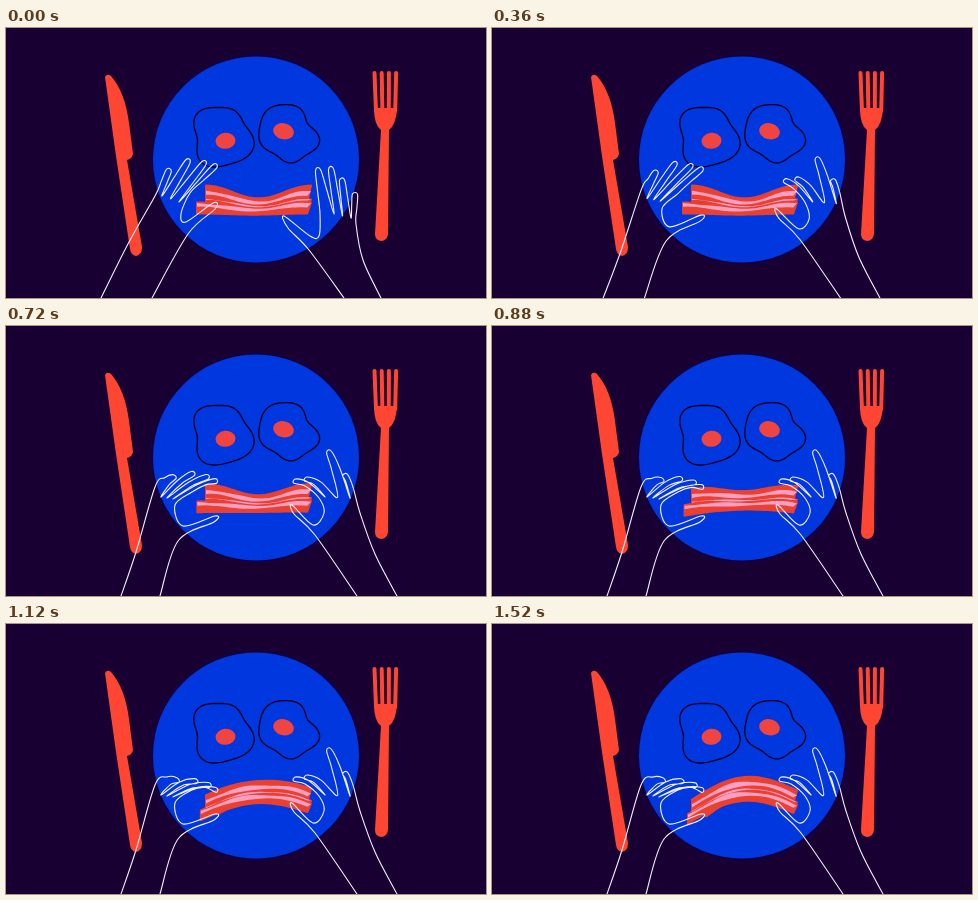
Recreate the animation shown at these times as an HTML page with a canvas. Size 480 by 270 pixels, loop 1560 ms.

```html
<!DOCTYPE html>
<html>
<head>
<meta charset="utf-8">
<title>Breakfast face</title>
<style>
html, body { margin: 0; overflow: hidden; background: #190033; }
canvas { display: block; }
</style>
</head>
<body>
<canvas id="stage" width="480" height="270"></canvas>
<script>
const ctx = document.getElementById('stage').getContext('2d');
const LOOP = 1560, STEP = 40, TAU = Math.PI * 2;
const NIGHT = '#190033', BLUE = '#0037de', RED = '#ff4632', YOLK = '#f04440';
const MEAT = '#e9402f', PINK = '#ff9fc3', INK = '#0c0024', CHALK = '#f4f0ff';

const lerp = (a, b, u) => a + (b - a) * u;
const mix = (p, q, u) => [lerp(p[0], q[0], u), lerp(p[1], q[1], u)];
const mixAll = (a, b, u) => a.map((p, i) => mix(p, b[i], u));
const points = text => text.split(' ').map(p => p.split(',').map(Number));
const ramp = (t, from, to) => Math.max(0, Math.min(1, (t - from) / (to - from)));
const easeOut = u => u * (2 - u);
const smooth = u => u * u * (3 - 2 * u);

// Open curve through the points.
function curve(pts) {
  const path = new Path2D(), last = pts.length - 1;
  path.moveTo(...pts[0]);
  for (let i = 0; i < last; i++) {
    const p = pts[Math.max(0, i - 1)], a = pts[i], b = pts[i + 1], q = pts[Math.min(last, i + 2)];
    path.bezierCurveTo(a[0] + (b[0] - p[0]) / 6, a[1] + (b[1] - p[1]) / 6,
      b[0] - (q[0] - a[0]) / 6, b[1] - (q[1] - a[1]) / 6, b[0], b[1]);
  }
  return path;
}

function fill(path, color) {
  ctx.fillStyle = color;
  ctx.fill(path);
}

function line(path, color, width) {
  ctx.strokeStyle = color;
  ctx.lineWidth = width;
  ctx.stroke(path);
}

function oval(x, y, rx, ry, turn = 0) {
  const path = new Path2D();
  path.ellipse(x, y, rx, ry, turn, 0, TAU);
  return path;
}

// Circle made uneven by waves of [height, phase], one more per turn each.
function blob(x, y, radius, waves) {
  const path = new Path2D();
  for (let a = 0; a < TAU; a += .05) {
    const r = waves.reduce((sum, [h, phase], i) => sum + h * Math.cos((i + 1) * a - phase), radius);
    path.lineTo(x + r * Math.cos(a), y + r * Math.sin(a));
  }
  path.closePath();
  return path;
}

const plate = oval(250, 131.5, 103, 103);
const eggs = [
  blob(217, 109, 29.8, [[1.1, 2.9], [1.7, 1.95], [2.3, .3], [1.9, 2.28], [.8, .17]]),
  blob(283, 106, 28.2, [[1.7, -2.84], [2.8, 1.5], [1.1, 1.4], [1.2, .55], [1.5, 1.1]])
];
const yolks = [oval(219.5, 112.8, 10, 8, -.1), oval(277.5, 103.3, 10.5, 8, .25)];
const knife = new Path2D('M99 49Q101 45 105 48Q119 64 123 95L127 126Q126 131 121 132L136 219Q136 227 130 228Q125 227 124 221L110 128Z');
const fork = new Path2D('M368 80H391Q390 97 383 102L382 206Q381 213 375 213Q369 212 369 206L375 102Q368 97 368 80');
const tines = new Path2D();
for (let i = 0; i < 4; i++) {
  tines.moveTo(368.5 + 7.2 * i, 45);
  tines.lineTo(370 + 6.4 * i, 83);
}

// Each pose: outer arm, fingertips from the little finger on, knuckle row ends, thumb and inner arm.
const pose = (outer, tips, knuckles, thumb) => [outer, tips, knuckles, thumb].map(points);

const left = {
  side: 1,
  open: pose('95,270 123,214 149,168', '163,142 182,133 198,135 209,138', '156,168 173,174',
    '184,165 175,186 180,194 207,175 209,181 182,206 146,270'),
  grip: pose('115,270 130,226 149,161', '172,156 190,157 203,161 210,166', '155,171 167,173',
    '186,166 169,179 177,200 209,190 208,196 172,215 154,270')
};
const right = {
  side: -1,
  open: pose('375,270 357,232 350,196', '349,166 336,152 325,141 312,142', '345,190 328,186',
    '314,186 313,208 304,208 278,188 282,200 303,222 338,270'),
  grip: pose('391,270 369,228 354,187', '339,149 323,126 300,153 289,155', '344,172 319,171',
    '313,172 318,187 307,199 286,179 288,188 309,209 351,270')
};

function drawHand({ side, open, grip }, reach, curl) {
  const [outer, tips, row, thumb] = open.map((part, i) => mixAll(part, grip[i], i === 1 ? curl : reach));
  const valleys = [outer[2], row[0], mix(...row, .5), row[1], thumb[0]];
  const fingers = tips.flatMap((tip, i) => {
    const a = valleys[i], b = valleys[i + 1], root = mix(a, b, .5);
    const dx = tip[0] - root[0], dy = tip[1] - root[1], k = 2.5 * side / Math.hypot(dx, dy);
    const edge = (from, s) => {
      const [x, y] = mix(from, tip, .55);
      return [x + s * dy * k * .6, y - s * dx * k * .6 - 4 * curl];
    };
    return [edge(a, 1), [tip[0] + dy * k, tip[1] - dx * k], [tip[0] - dy * k, tip[1] + dx * k], edge(b, -1), b];
  });
  line(curve([...outer, ...fingers, ...thumb.slice(1)]), CHALK, 1.1);
}

// The strip sags when bend is 0 and arches when it is 1; v runs from its top to its bottom edge.
function drawBacon(bend) {
  const spot = (u, v, shift) => {
    const hill = Math.sin(Math.PI * u);
    const sag = 157 + 29 * v + (13 - 12 * v) * hill * hill;
    const arch = 175 - 9 * u + 25 * v - 18 * hill;
    return [lerp(200 - shift, 305, u), lerp(sag, arch, bend)];
  };
  const band = (from, to, shift, color, wobble = 0) => {
    const path = new Path2D();
    for (let i = 0; i <= 60; i++) {
      const u = (i <= 30 ? i : 60 - i) / 30;
      path.lineTo(...spot(u, (i <= 30 ? from : to) + wobble * Math.sin(11 * u + i / 15), shift));
    }
    path.closePath();
    fill(path, color);
    if (color === MEAT) line(path, color, 2);
  };
  const shift = 9 - 5 * bend;
  band(.6, .98, shift, MEAT);
  band(.02, .56, 0, MEAT);
  band(.5, .7, -14, MEAT);
  band(.2, .36, 0, PINK, .03);
  band(.48, .53, 0, PINK, .02);
  band(.62, .77, shift, PINK, .03);
}

function draw(t) {
  const reach = easeOut(ramp(t, 0, 640));
  fill(new Path2D('M0 0H480V270H0Z'), NIGHT);
  line(plate, '#16003c', 6);
  fill(plate, BLUE);
  fill(knife, RED);
  fill(fork, RED);
  line(tines, RED, 4);
  eggs.forEach(egg => line(egg, INK, 1.4));
  yolks.forEach(yolk => fill(yolk, YOLK));
  drawBacon(smooth(ramp(t, 600, 1360)));
  drawHand(left, reach, smooth(ramp(t, 150, 1150)));
  drawHand(right, reach, reach);
}

function frame(now) {
  draw(Math.floor(now % LOOP / STEP) * STEP);
  requestAnimationFrame(frame);
}

ctx.lineJoin = ctx.lineCap = 'round';
requestAnimationFrame(frame);
</script>
</body>
</html>
```
